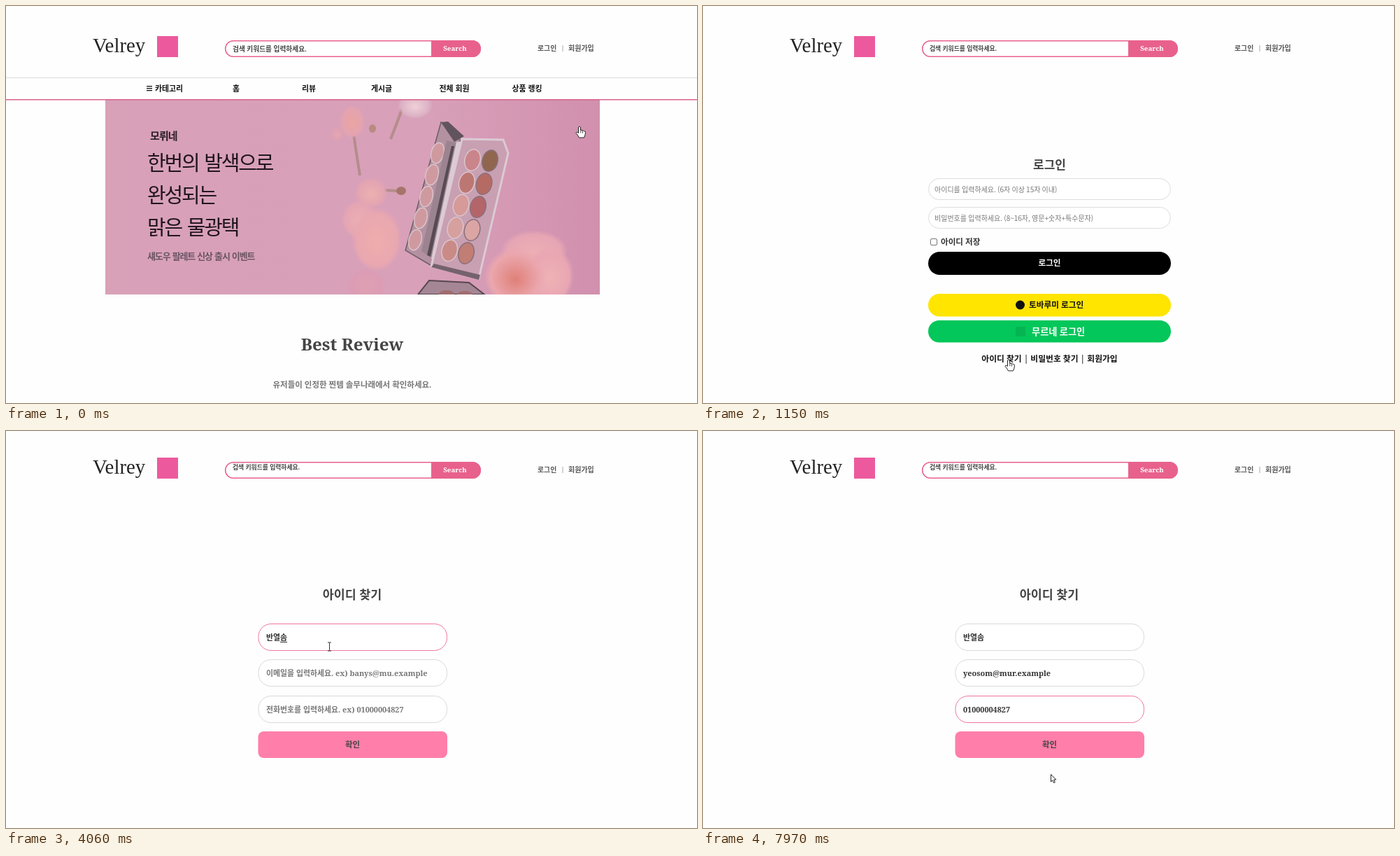
These frames come from a looping animation (988 px wide and 567 px high, 8000 ms). An HTML page with a canvas:

```html
<!DOCTYPE html>
<html lang="ko">
<head>
<meta charset="utf-8">
<title>아이디 찾기</title>
<style>
html, body { margin: 0; width: 100%; height: 100%; overflow: hidden; background: #fefefe; }
canvas { display: block; }
</style>
</head>
<body>
<canvas id="stage" width="988" height="567"></canvas>
<script>
const ctx = document.getElementById('stage').getContext('2d');
const LOOP = 8000, LOGIN_AT = 710, FIND_AT = 1420;
const SOFT = '"Noto Serif", "Noto Sans CJK KR", sans-serif';
const SANS = '"Noto Sans CJK KR", sans-serif';
const PINK = '#e8618c';

const clamp = v => Math.max(0, Math.min(1, v));
const ease = v => v * v * (3 - 2 * v);

// y is the visual middle of the glyphs; returns the advance width
function text(str, x, y, size, color, o = {}) {
  ctx.font = `${o.weight || 700} ${size}px ${o.family || SOFT}`;
  ctx.letterSpacing = (o.gap || 0) + 'px';
  ctx.wordSpacing = (o.space || 0) + 'px';
  ctx.textAlign = o.align || 'left';
  ctx.fillStyle = color;
  ctx.fillText(str, x, y + size * 0.37);
  return ctx.measureText(str).width;
}
const centered = (str, x, y, size, color, o) => text(str, x, y, size, color, { ...o, align: 'center' });

function paint(fill, stroke, line = 1) {
  if (fill) { ctx.fillStyle = fill; ctx.fill(); }
  if (stroke) { ctx.strokeStyle = stroke; ctx.lineWidth = line; ctx.stroke(); }
}

function pill(x, y, w, h, r, fill, stroke, line) {
  ctx.beginPath();
  ctx.roundRect(x, y, w, h, r);
  paint(fill, stroke, line);
}

function rect(x, y, w, h, color) {
  ctx.fillStyle = color;
  ctx.fillRect(x, y, w, h);
}

function poly(points, fill, stroke, line) {
  ctx.beginPath();
  points.forEach(([x, y]) => ctx.lineTo(x, y));
  ctx.closePath();
  paint(fill, stroke, line);
}

function oval(x, y, rx, ry, turn, fill, stroke, line) {
  ctx.beginPath();
  ctx.ellipse(x, y, rx, ry, turn, 0, Math.PI * 2);
  paint(fill, stroke, line);
}

function header(dy, hintSize, hintY) {
  text('Velrey', 124, 55.5 + dy, 28.8, '#222', { weight: 400, family: '"Liberation Serif", serif' });
  rect(216, 43 + dy, 30, 30, '#ec5a9d');
  pill(313.7, 49.7 + dy, 364.6, 22.6, 11.3, '#fff', PINK, 1.5);
  pill(608, 49 + dy, 71, 24, [0, 12, 12, 0], PINK);
  text('검색 키워드를 입력하세요.', 324, hintY, hintSize, '#444');
  centered('Search', 642, 60 + dy, 9.7, '#fff');
  text('로그인', 760, 60 + dy, 9.9, '#555');
  rect(795.5, 56 + dy, 1, 9, '#aaa');
  text('회원가입', 804, 60 + dy, 10, '#555');
}

function blossom(x, y, rx, ry, inner, outer) {
  ctx.save();
  ctx.translate(x, y);
  ctx.scale(rx, ry);
  const g = ctx.createRadialGradient(0, 0.1, 0, 0, 0, 1);
  g.addColorStop(0, inner);
  g.addColorStop(0.8, outer);
  g.addColorStop(1, outer + '00');
  oval(0, 0, 1, 1, 0, g);
  ctx.restore();
}

function stem(x1, y1, cx, cy, x2, y2) {
  ctx.beginPath();
  ctx.moveTo(x1, y1);
  ctx.quadraticCurveTo(cx, cy, x2, y2);
  paint(null, '#b58d8c', 4);
}

function palette() {
  poly([[622, 166], [650, 192], [612, 373], [571, 349]], '#b391a1', '#6d5d67', 1.5);
  for (let i = 0; i < 5; i++) oval(617 - 8 * i, 210 + 31 * i, 9, 15, 0.25, '#cf9a9f', '#dcc3cc', 1.5);
  poly([[622, 166], [632, 165], [655, 186], [641, 194]], '#62545d');
  poly([[630, 192], [646, 196], [612, 362], [594, 350]], '#9c8390');
  poly([[637, 200], [641, 200], [607, 358], [602, 356]], '#574a53');
  poly([[644, 194], [651, 194], [614, 364], [608, 361]], '#dccbd4');
  poly([[652, 190], [711, 191], [718, 210], [676, 389], [608, 372]], '#c8a0b2', '#dccad3', 3);
  poly([[608, 373], [612, 368], [678, 384], [676, 391]], '#75626d');
  const left = ['#c9858a', '#bd7773', '#d69a98', '#d6a09e', '#ca8b87'];
  const right = ['#91664e', '#b56b64', '#b4656a', '#dba5a4', '#c07e75'];
  for (let i = 0; i < 5; i++) {
    oval(667 - 8.2 * i, 220 + 32.3 * i, 11, 15.5, 0.25, left[i], '#dcc4cd', 1.5);
    oval(692 - 8.5 * i, 221 + 33 * i, 11, 15.5, 0.25, right[i], '#8b707c', 1.5);
  }
  poly([[589, 412], [605, 392], [662, 395], [684, 412]], '#a58694', '#57474f', 2);
  oval(630, 411, 11, 5, 0, '#a06c70');
  oval(656, 412, 11, 5, 0, '#a06c70');
}

function banner() {
  ctx.save();
  ctx.beginPath();
  ctx.rect(142, 134, 707, 278);
  ctx.clip();
  const g = ctx.createLinearGradient(142, 0, 849, 0);
  g.addColorStop(0, '#d8a1b8');
  g.addColorStop(0.65, '#d8a0b9');
  g.addColorStop(1, '#d190ae');
  rect(142, 134, 707, 278, g);
  stem(496, 175, 500, 205, 506, 242);
  stem(568, 142, 560, 165, 550, 190);
  stem(528, 264, 548, 262, 566, 265);
  oval(565, 264, 7, 6, 0, '#a6756a');
  oval(524, 175, 5, 6, 0, '#b88b82');
  blossom(495, 165, 18, 24, '#eba4a0', '#e3a3b0');
  blossom(474, 183, 10, 11, '#e6a5b2', '#dda0b4');
  blossom(585, 142, 25, 19, '#efd0d8', '#dcb2c4');
  blossom(522, 267, 24, 22, '#edb1b0', '#e3a4b2');
  blossom(505, 305, 25, 28, '#ecb0b3', '#e5a5b3');
  blossom(530, 333, 36, 46, '#eeadac', '#e9a7b0');
  blossom(515, 400, 28, 26, '#dfa0b2', '#dc9cb4');
  blossom(755, 350, 48, 30, '#edb0b4', '#e7a5b4');
  blossom(778, 385, 34, 42, '#efb2b4', '#e9a6b3');
  blossom(728, 387, 44, 42, '#df8078', '#eba7ae');
  palette();
  ctx.restore();

  text('모뤼네', 206, 185, 15, '#2a1d26', { family: SANS, gap: -0.9 });
  ['한번의 발색으로', '완성되는', '맑은 물광택'].forEach((line, i) =>
    text(line, 202, 224.5 + 45.7 * i, 29, '#21151d', { weight: 400, family: SANS, gap: -2.2, space: 3.5 }));
  text('섀도우 팔레트 신상 출시 이벤트', 202, 357.5, 13, '#6a5463', { family: SANS, gap: -1.1, space: 1.2 });
}

function homePage() {
  header(0, 9.7, 61);
  rect(0, 102, 988, 1, '#dcdcdc');
  for (let i = 0; i < 3; i++) rect(201, 114 + 3 * i, 8, 1.3, '#111');
  text('카테고리', 213, 118, 10.9, '#111');
  [['홈', 329], ['리뷰', 433], ['게시글', 537], ['전체 회원', 641], ['상품 랭킹', 745]]
    .forEach(([label, x]) => centered(label, x, 118, 10.9, '#111'));
  banner();
  rect(0, 133, 988, 1.5, '#d9638b');
  centered('Best Review', 495, 483, 24.2, '#444');
  centered('유저들이 인정한 찐템 솔무나래에서 확인하세요.', 495, 541, 11.5, '#777');
}

function loginPage() {
  header(0, 8.8, 61);
  centered('로그인', 495.5, 227, 17, '#444');
  const hint = { weight: 400, family: SANS };
  pill(322.5, 246.5, 346, 30, 15, '#fff', '#ddd');
  text('아이디를 입력하세요. (6자 이상 15자 이내)', 331, 262, 10, '#777', hint);
  pill(322.5, 287.5, 346, 30, 15, '#fff', '#ddd');
  text('비밀번호를 입력하세요. (8~16자, 영문+숫자+특수문자)', 331, 303, 10, '#777', hint);
  pill(325.5, 332.5, 9, 9, 1.5, '#fff', '#777');
  text('아이디 저장', 340, 337, 11.6, '#333');
  pill(322, 351, 347, 33, 16.5, '#000');
  centered('로그인', 495.5, 367, 11.6, '#fff');
  pill(322, 411, 347, 32.5, 16, '#ffe500');
  oval(453.5, 427, 6.5, 6.5, 0, '#111');
  text('토바루미 로그인', 466, 427, 11.7, '#111');
  pill(322, 449, 347, 31.5, 16, '#03c75a');
  rect(447, 458, 14, 14, '#06b552');
  text('무르네 로그인', 470, 465, 13.2, '#fff');
  centered('아이디 찾기 | 비밀번호 찾기 | 회원가입', 495.5, 504, 11.8, '#111');
}

const latest = (steps, t) => steps.reduce((now, [at, s]) => t >= at ? s : now, '');
const nameSteps = [[2570, 'ㅂ'], [2660, '바'], [2750, '반'], [2990, '반ㅇ'], [3095, '반여'],
  [3200, '반열'], [3350, '반열ㅅ'], [3440, '반열소'], [3530, '반열솜']];
const mailSteps = [[4660, 'yeosom@mur.example']];
const phoneSteps = [5690, 5770, 5850, 6030, 6210, 6370, 6520, 6730, 6910, 7090, 7270]
  .map((at, i) => [at, '01000004827'.slice(0, i + 1)]);

const fields = [
  { y: 275, hint: '이름을 입력하세요. ex) 반열솜', steps: nameSteps, focus: 2000, blur: 4060, compose: true },
  { y: 326.5, hint: '이메일을 입력하세요. ex) banys@mu.example', steps: mailSteps, focus: 4060, blur: 5130 },
  { y: 378, hint: '전화번호를 입력하세요. ex) 01000004827', steps: phoneSteps, focus: 5130, blur: 9000, caretOff: 7700 }
];
const CARET_LAG = 70;

function field(f, t) {
  const glow = ease(clamp((t - f.focus) / 270)) - ease(clamp((t - f.blur) / 300));
  const mix = (a, b) => Math.round(a + (b - a) * glow);
  pill(361, Math.floor(f.y) + 0.5, 269.5, 38, 18, '#fff', `rgb(${mix(217, 240)},${mix(217, 118)},${mix(217, 160)})`);
  const mid = f.y + 19.5;
  const value = latest(f.steps, t);
  const width = text(value || f.hint, 372, mid, 10.9, value ? '#333' : '#777');
  if (t < f.focus + CARET_LAG || t >= f.blur + CARET_LAG) return;
  if (f.compose && value) {
    const last = ctx.measureText(value.slice(-1)).width;
    rect(372 + width - last, Math.round(mid + 6), last, 1, '#333');
  } else if (t < (f.caretOff || LOOP)) {
    rect(Math.round(372 + (value ? width : 0)), Math.round(mid - 7), 1, 14, '#222');
  }
}

function findPage(t) {
  header(-5, 8.8, 51.5);
  centered('아이디 찾기', 495, 234, 17.4, '#444');
  fields.forEach(f => field(f, t));
  pill(360.5, 429, 270.5, 38, 8, '#ff7faa');
  centered('확인', 495.5, 448, 11.4, '#444');
}

// Pointer path: time, x, y of the hot spot
const path = [[20, 820, 172], [180, 797, 118], [360, 778, 60], [590, 772, 58], [680, 751, 107],
  [709, 751, 107], [710, 690, 232], [750, 690, 232], [810, 549, 432], [960, 485, 470],
  [1150, 437, 505], [1420, 437, 505], [1520, 446.5, 451.5], [1610, 456, 360], [1700, 462.5, 308],
  [7640, 462.5, 308], [7790, 490, 400], [7970, 497, 490]];

function pointerAt(t) {
  const i = path.findIndex(p => p[0] > t);
  if (i === 0) return path[0].slice(1);
  if (i < 0) return path[path.length - 1].slice(1);
  const [a, b] = [path[i - 1], path[i]];
  const k = (t - a[0]) / (b[0] - a[0]);
  return [a[1] + (b[1] - a[1]) * k, a[2] + (b[2] - a[2]) * k];
}

function arrow() {
  poly([[0.5, 0.5], [0.5, 11], [2.8, 8.8], [4.5, 12.5], [6.3, 11.7], [4.7, 8], [7.8, 8]], '#fff', '#222');
}

function hand() {
  ctx.beginPath();
  ctx.moveTo(-1.5, 9);
  ctx.lineTo(-1.5, 1);
  ctx.quadraticCurveTo(0, -1, 1.5, 1);
  ctx.lineTo(1.5, 5.5);
  ctx.quadraticCurveTo(3, 4.5, 4.2, 6);
  ctx.quadraticCurveTo(5.6, 5.2, 6.6, 6.8);
  ctx.quadraticCurveTo(8.5, 6.3, 8.5, 8.5);
  ctx.quadraticCurveTo(8.5, 12, 6.5, 16);
  ctx.lineTo(-0.5, 16);
  ctx.quadraticCurveTo(-2, 13, -5, 9.5);
  ctx.quadraticCurveTo(-4.5, 7, -1.5, 9.5);
  ctx.closePath();
  paint('#fff', '#222');
  rect(1.5, 5.5, 0.8, 4, '#222');
  rect(4, 6.2, 0.8, 3.5, '#222');
}

function beam() {
  rect(-0.5, -5.5, 1, 11, '#333');
  rect(-2.5, -6.5, 5, 1, '#333');
  rect(-2.5, 5.5, 5, 1, '#333');
}

function pointer(t) {
  const [x, y] = pointerAt(t);
  const within = (left, right, tops, h) => x > left && x < right && tops.some(top => y >= top && y <= top + h);
  let shape = arrow;
  if (t < LOGIN_AT) shape = hand;
  else if (t < FIND_AT) {
    if (within(402, 589, [497], 14)) shape = hand;
    else if (within(322, 669, [247, 288], 30)) shape = beam;
  } else if (within(361, 631, [275, 326, 378], 38)) shape = beam;
  ctx.save();
  ctx.translate(x, y);
  shape();
  ctx.restore();
}

const start = performance.now();
function draw() {
  const t = (performance.now() - start) % LOOP;
  rect(0, 0, 988, 567, '#fefefe');
  if (t < LOGIN_AT) homePage();
  else if (t < FIND_AT) loginPage();
  else findPage(t);
  pointer(t);
  requestAnimationFrame(draw);
}
draw();
</script>
</body>
</html>
```
